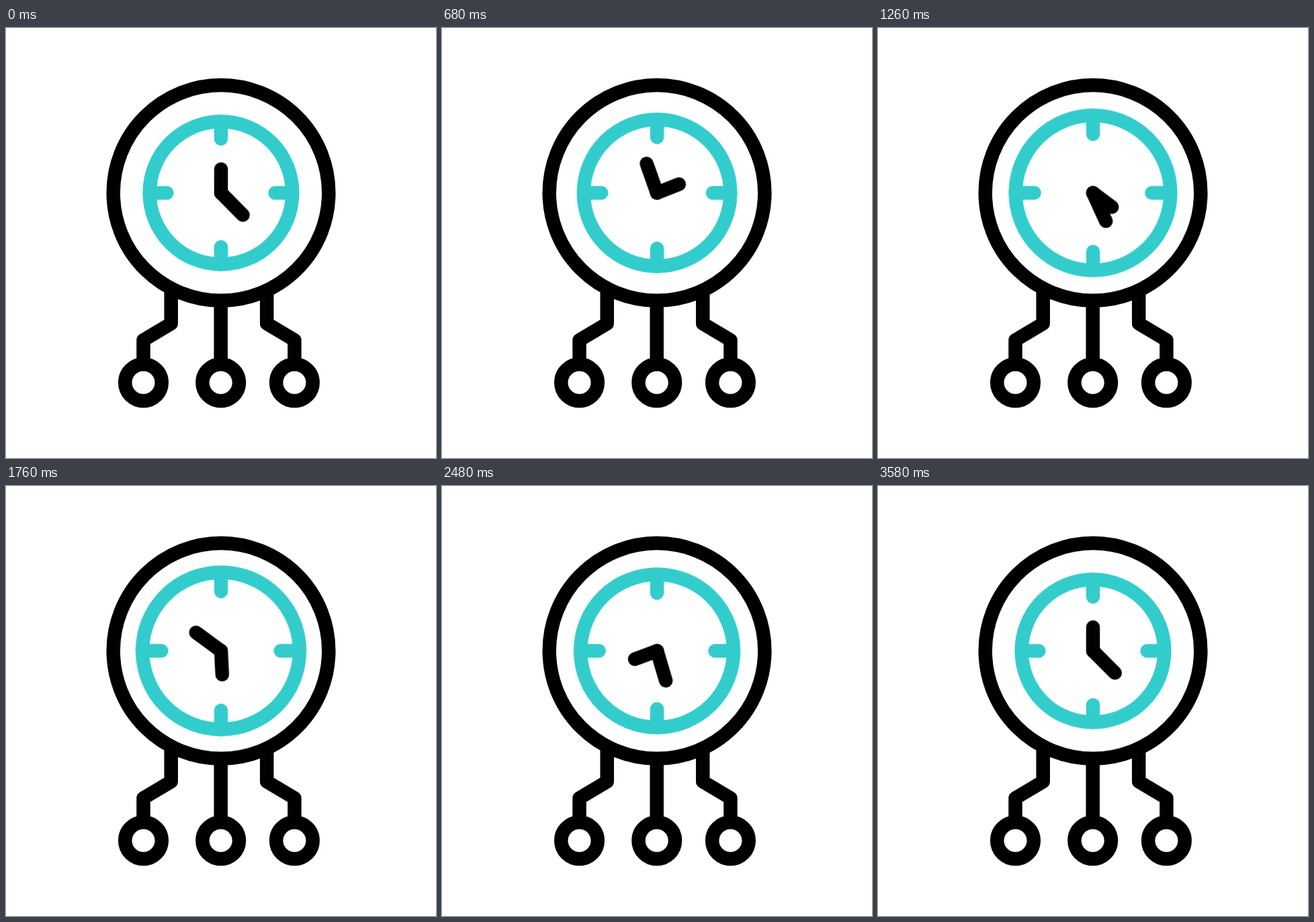
Animation, 640 px wide and 640 px high, one loop 3.6 s. Source, as an HTML page without scripts:

```html
<!DOCTYPE html>
<html lang="en">
<head>
<meta charset="utf-8">
<title>Clock</title>
<style>
  html, body { margin: 0; width: 100%; height: 100%; overflow: hidden; background: #fff; }
  svg { display: block; width: 100%; height: 100%; }
  .lines { fill: none; stroke: #000; stroke-width: 20.5; stroke-linejoin: round; }
  .dial { stroke: #33cccc; animation: pulse 3.6s cubic-bezier(.5, 0, .5, 1) infinite; }
  .dial * { vector-effect: non-scaling-stroke; }
  .round { stroke-linecap: round; }
  .hour { animation: turn 3.6s linear infinite; --turn: 360deg; }
  .minute { animation: turn 3.6s linear infinite; --turn: 1080deg; }

  /* Motion takes 3.58 s, then rests for the last 20 ms. */
  @keyframes turn {
    from { transform: rotate(0deg); }
    99.444%, to { transform: rotate(var(--turn)); }
  }
  @keyframes pulse {
    0%, 99.444%, 100% { transform: scale(1); }
    49.722% { transform: scale(1.1); }
  }
</style>
</head>
<body>
<svg viewBox="0 0 640 640">
  <g class="lines">
    <path d="M245.7 387.5V440L204.5 464.5V500M319.7 406V500M388.2 387.5V440L429.4 464.5V500"/>
    <circle cx="204.5" cy="527.7" r="27.3"/>
    <circle cx="319.7" cy="527.7" r="27.3"/>
    <circle cx="429.4" cy="527.7" r="27.3"/>
    <g transform="translate(320 245.4)">
      <circle r="160.3"/>
      <g class="dial">
        <circle r="106.3"/>
        <path class="round" d="M0-106.3V-80.6M0 106.3V80.6M-106.3 0H-80.6M106.3 0H80.6"/>
      </g>
      <path class="round hour" d="M0 0V-35.3"/>
      <path class="round minute" d="M0 0L32.7 32.7"/>
    </g>
  </g>
</svg>
</body>
</html>
```
